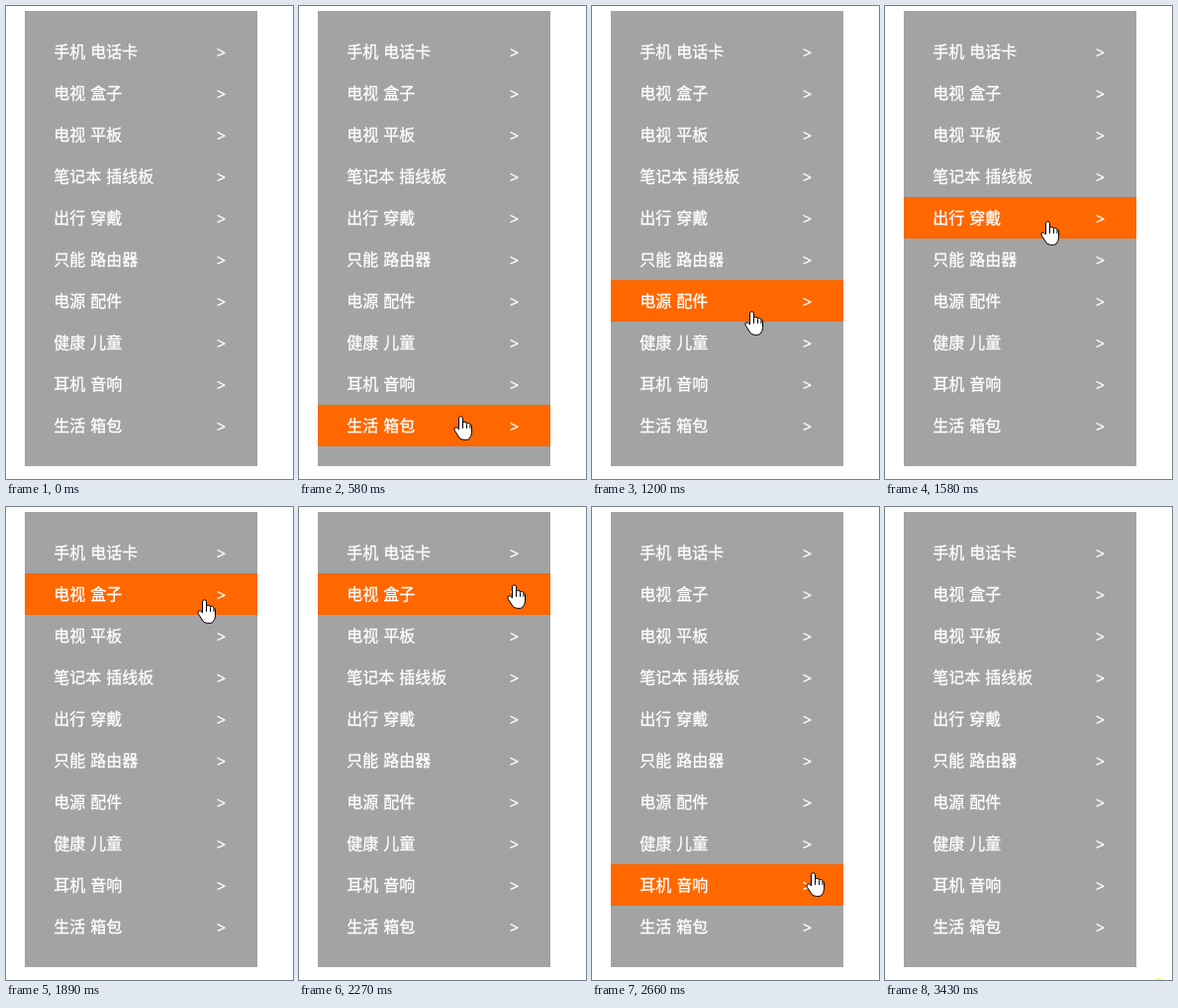
These frames come from a looping animation (290 px wide and 478 px high, 3510 ms). An HTML page with a canvas:

```html
<!DOCTYPE html>
<html lang="zh">
<meta charset="utf-8">
<style>
html, body { margin: 0; height: 100%; overflow: hidden; background: #fff; }
canvas { display: block; }
</style>
<canvas width="290" height="478"></canvas>
<script>
const LOOP = 3510, START = 200, STEP = 1000 / 13;
const LEFT = 19, WIDTH = 235, TOP = 25, ROW = 42;
const items = ['手机 电话卡', '电视 盒子', '电视 平板', '笔记本 插线板', '出行 穿戴',
  '只能 路由器', '电源 配件', '健康 儿童', '耳机 音响', '生活 箱包'];

// Places where the pointer slows down
const stops = [
  { at: 0, x: 152, y: 456 },
  { at: 5, x: 163, y: 414 },
  { at: 13, x: 161, y: 308 },
  { at: 18, x: 164, y: 217 },
  { at: 26, x: 212, y: 52 },
  { at: 27, x: 217, y: 78 },
  { at: 32, x: 223, y: 369 },
  { at: 38, x: 269, y: 466 }
];
const hand = new Path2D('M-2 13V2a2 2 0 0 1 4 0V7a2 1.8 0 0 1 4 .6a1.8 1.7 0 0 1 3.4 1' +
  'a1.5 1.5 0 0 1 1.6 1.6V16Q11 20 8 23Q6 24 3 23.5Q0 23.5-1.5 21.5L-6 14.5Q-7.2 12-6 11.2Q-4 10.4-2 13z');
const knuckles = new Path2D('M2 7v5M6 8v4M9.4 9v3');
const arrow = new Path2D('M0 0V16.5L3.8 13L6.5 19L9 18L6.5 12H11.5z');
const ctx = document.querySelector('canvas').getContext('2d');

const easeOut = k => 1 - (1 - k) ** 2;

function pointerAt(step) {
  const i = stops.findIndex(s => s.at > step);
  if (step < 0 || step > stops.at(-1).at) return null;
  if (i < 0) return stops.at(-1);
  const a = stops[i - 1], b = stops[i];
  const k = easeOut((step - a.at) / (b.at - a.at));
  return { x: Math.round(a.x + (b.x - a.x) * k), y: Math.round(a.y + (b.y - a.y) * k) };
}

function label(text, x, y) {
  ctx.fillText(text, x, y);
  ctx.strokeText(text, x, y);
}

function drawMenu(active) {
  ctx.fillStyle = '#a3a3a3';
  ctx.fillRect(LEFT, 5, WIDTH, 460);
  ctx.fillStyle = '#ff6700';
  if (active >= 0) ctx.fillRect(LEFT, TOP + active * ROW, WIDTH, ROW);
  ctx.fillStyle = ctx.strokeStyle = '#fff';
  ctx.lineWidth = .3;
  items.forEach((item, i) => {
    const y = TOP + i * ROW + 27, [a, b] = item.split(' ');
    ctx.font = '16px "Noto Sans CJK SC", "Noto Sans CJK", sans-serif';
    label(a, 48.3, y);
    label(b, 48.3 + a.length * 16 + 5, y);
    ctx.font = '16px "Noto Sans", sans-serif';
    label('>', 213, y + 1);
  });
}

function drawPointer({ x, y }, isHand) {
  ctx.save();
  ctx.translate(x + .5, y + .8);
  ctx.fillStyle = '#fff';
  ctx.strokeStyle = '#000';
  ctx.lineWidth = 1;
  const shape = isHand ? hand : arrow;
  ctx.fill(shape);
  ctx.stroke(shape);
  if (isHand) ctx.stroke(knuckles);
  ctx.restore();
}

function draw(now) {
  const t = now % LOOP;
  const step = t < START ? -1 : Math.floor((t - START + 8) / STEP);
  const pos = pointerAt(step);
  const row = pos ? Math.floor((pos.y - TOP) / ROW) : -1;
  const active = row < items.length ? row : -1;
  ctx.fillStyle = '#fff';
  ctx.fillRect(0, 0, 290, 478);
  drawMenu(active);
  if (pos) drawPointer(pos, active >= 0);
  if (step >= 42) {
    ctx.fillStyle = '#ffff80';
    ctx.beginPath();
    ctx.arc(277, 486, 10, 0, 7);
    ctx.fill();
  }
}

const begin = performance.now();
function tick() {
  draw(performance.now() - begin);
  requestAnimationFrame(tick);
}
tick();
</script>
</html>
```
